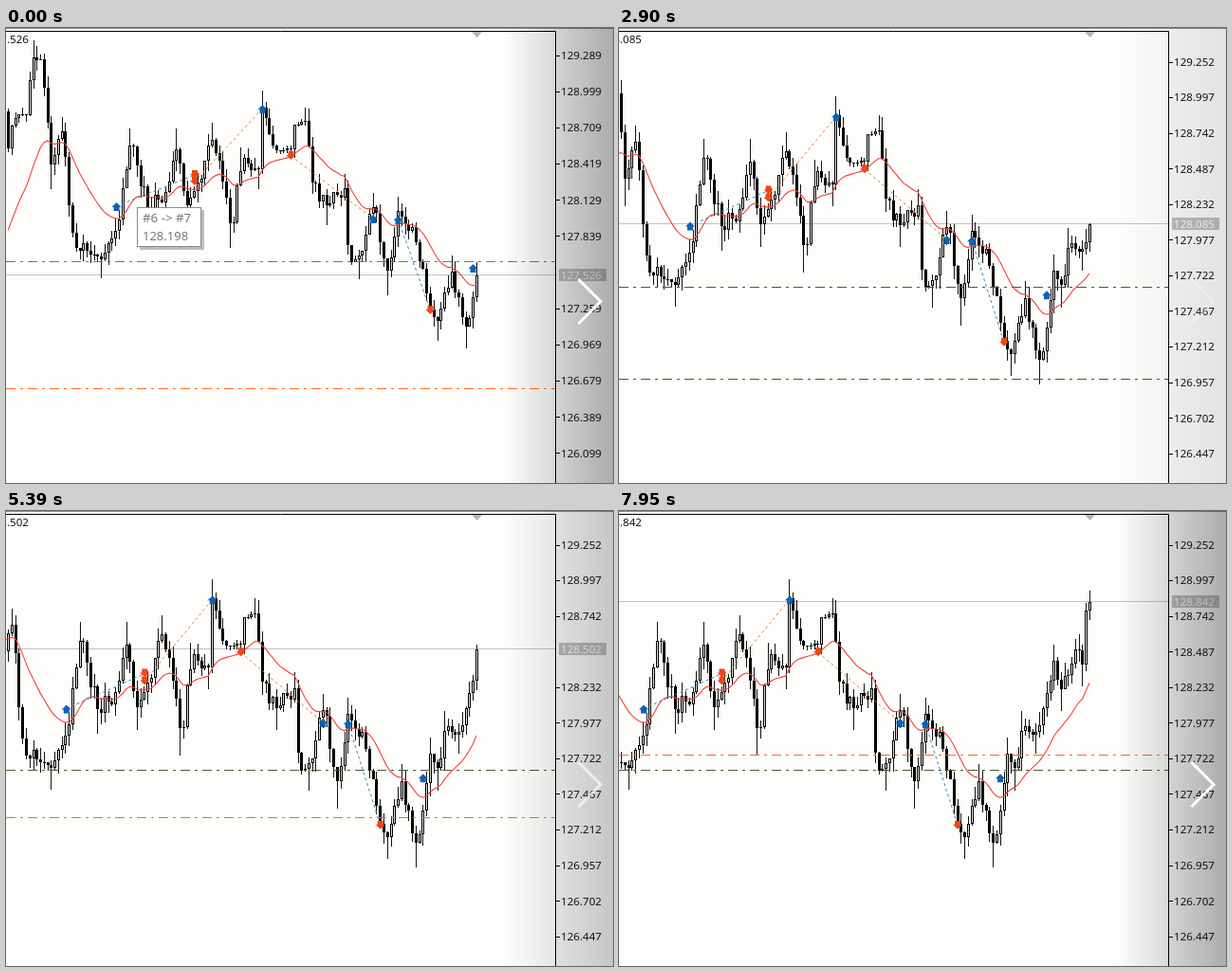
Recreate the animation shown at these times as an HTML page with a canvas. Size 640 by 480 pixels, loop 8 s.

```html
<!DOCTYPE html>
<html lang="en">
<head>
<meta charset="utf-8">
<title>Price chart replay</title>
<style>
html, body { margin: 0; width: 100%; height: 100%; overflow: hidden; background: #fdfdfc; }
canvas { display: block; width: 640px; height: 480px; }
</style>
</head>
<body>
<canvas id="stage" width="640" height="480"></canvas>
<script>
const ctx = document.getElementById('stage').getContext('2d');
const LOOP = 8000, PITCH = 3.77, LAST_X = 496, AXIS = 580;
const FIRST = -131, NEWEST = 24, ENTRY = 127.63, EMA_RATE = 2 / 22;
const BLUE = '#0e63b4', ORANGE = '#ee4716', FLAME = '#ff6a1e', INK = '#141414';

const WIDE = { top: 129.289, y: 28.5, step: 0.29, gap: 38.18, entry: '#3f9a4a' };
const TIGHT = { top: 129.252, y: 35.5, step: 0.255, gap: 37.57, entry: '#4d5a30' };

// last = newest candle shown, stop = price of the stop line
const screens = [
  { at: 0, last: 0, price: 127.526, scale: WIDE, stop: 126.615, tip: true },
  { at: 1590, last: 4, price: 127.721, scale: WIDE, stop: 126.8 },
  { at: 2650, last: 11, price: 128.085, scale: TIGHT, stop: 126.976, ink: TIGHT.entry },
  { at: 3760, last: 13, price: 128.056, scale: TIGHT, stop: 127.132 },
  { at: 4950, last: 14, price: 128.502, scale: TIGHT, stop: 127.295 },
  { at: 6100, last: 15, price: 128.379, scale: TIGHT, stop: 127.499 },
  { at: 7340, last: 24, price: 128.842, scale: TIGHT, stop: 127.74 }
];

// Turning points of the price, in pixels of the wide scale
const turns = [
  [2,128],[7,96],[21,92],[29,27],[36,32],[48,150],[59,108],[71,226],[86,236],[101,244],
  [116,212],[131,120],[150,192],[170,170],[181,120],[190,188],[206,158],[218,114],[237,212],
  [249,140],[266,150],[270,80],[282,128],[300,128],[304,100],[316,98],[321,160],[338,188],
  [357,168],[361,243],[370,245],[387,188],[403,262],[412,192],[430,212],[448,302],[455,310],
  [469,254],[480,303],[486,318],[500,229],[507,245],[516,204],[530,210],[549,142],[556,170],
  [575,132],[579,147],[583,91],[587,88]
];

// dir 1 = buy, -1 = sell; the last position stays open
const trades = [
  { dir: 1, from: [116.5, 188], to: [199, 155] },
  { dir: -1, from: [199, 162], to: [270.5, 85] },
  { dir: -1, from: [300.5, 135], to: [387, 201] },
  { dir: 1, from: [413.5, 202], to: [447.5, 298] },
  { dir: 1, from: [492.5, 253] }
];

const toWide = p => WIDE.y + (WIDE.top - p) / WIDE.step * WIDE.gap;
const toPrice = y => WIDE.top - (y - WIDE.y) / WIDE.gap * WIDE.step;

function noise(n) {
  const s = Math.sin(n * 127.1 + 11.7) * 43758.5453;
  return s - Math.floor(s);
}

// Closes follow the turns; steep stretches are rougher, and turns get long wicks.
function makeCandles() {
  const list = [];
  let open = 88, ema = 222;
  for (let i = FIRST; i <= NEWEST; i++) {
    const x = LAST_X + i * PITCH;
    const k = Math.max(1, turns.findIndex((p, n) => p[0] >= x || n === turns.length - 1));
    const [x0, y0] = turns[k - 1], [x1, y1] = turns[k];
    const slope = (y1 - y0) / (x1 - x0);
    const near = turns.findIndex(p => Math.abs(p[0] - x) <= PITCH / 2);
    const rough = near < 0 ? Math.min(18, 3 + Math.abs(slope) * 14) : 0;
    const close = y0 + slope * (Math.min(x, x1) - x0) + (noise(i) - 0.5) * rough;
    const reach = Math.min(13, 4 + Math.abs(slope) * 12);
    let high = Math.min(open, close) - noise(i + 300) * reach;
    let low = Math.max(open, close) + noise(i + 600) * reach;
    if (near > 0 && near < turns.length - 1) {
      const before = turns[near][1] - turns[near - 1][1];
      const after = turns[near][1] - turns[near + 1][1];
      if (before > 0 && after > 0) low = Math.max(low, turns[near][1] + 20);
      if (before < 0 && after < 0) high = Math.min(high, turns[near][1] - 14);
    }
    list.push({ i, x, open, close, high, low, emaBefore: ema });
    ema += (close - ema) * EMA_RATE;
    open = close;
  }
  return list;
}
const candles = makeCandles();

function line(points, ink, dash = [], width = 1) {
  ctx.strokeStyle = ink;
  ctx.lineWidth = width;
  ctx.setLineDash(dash);
  ctx.beginPath();
  points.forEach(([x, y]) => ctx.lineTo(x, y));
  ctx.stroke();
  ctx.setLineDash([]);
}
function rect(x, y, w, h, fill) {
  ctx.fillStyle = fill;
  ctx.fillRect(x, y, w, h);
}
function shape(points, fill) {
  ctx.fillStyle = fill;
  ctx.beginPath();
  points.forEach(([x, y]) => ctx.lineTo(x, y));
  ctx.fill();
}
function text(str, x, y, ink, size = 11.6, align = 'left') {
  ctx.font = `${size}px "Noto Sans", "Open Sans", sans-serif`;
  ctx.textAlign = align;
  ctx.fillStyle = ink;
  ctx.fillText(str, x, y);
}

function drawBackground() {
  rect(0, 0, 640, 480, '#fdfdfc');
  rect(AXIS, 0, 60, 480, '#f6f6f6');
  rect(0, 0, 640, 1, '#909090');
}

function drawCandle(c, x, close, Y) {
  x = Math.round(x);
  const top = Math.round(Y(Math.min(c.open, close)));
  const height = Math.max(1, Math.round(Y(Math.max(c.open, close))) - top);
  const high = Math.min(Math.round(Y(c.high)), top);
  const low = Math.max(Math.round(Y(c.low)), top + height);
  rect(x, high, 1, low - high, INK);
  rect(x - 1, top, 3, height, '#000');
  if (close < c.open && height > 2) rect(x, top + 1, 1, height - 2, '#e2e2dc');
}

function drawArrow(x, y, dir) {
  const outline = [[-5, 1], [0, -4], [5, 1], [3, 1], [3, 5], [-3, 5], [-3, 1]];
  shape(outline.map(([dx, dy]) => [x + dx, y + dy * dir]), dir > 0 ? BLUE : ORANGE);
}

function drawTrades(place) {
  for (const { dir, from, to } of trades) {
    if (to) {
      line([place(from), place(to)], dir > 0 ? '#3a86b4' : '#e8803a', [3, 3]);
      drawArrow(...place(to), -dir);
    }
    drawArrow(...place(from), dir);
  }
}

function drawPlot(s, priceY) {
  const { scale, last } = s;
  const Y = y => priceY(toPrice(y));
  const X = x => x - last * PITCH;
  const level = (price, ink, dash) => {
    const y = Math.round(priceY(price)) - 0.5;
    line([[0, y], [AXIS, y]], ink, dash);
  };

  ctx.save();
  ctx.beginPath();
  ctx.rect(0, 4, AXIS, 476);
  ctx.clip();
  level(s.price, '#c2c2c6');

  const average = [];
  for (const c of candles.filter(c => c.i <= last)) {
    const close = c.i === last ? toWide(s.price) : c.close;
    drawCandle(c, X(c.x), close, Y);
    average.push([X(c.x), Y(c.emaBefore + (close - c.emaBefore) * EMA_RATE)]);
  }
  line(average, '#f0403a', [], 1.1);

  drawTrades(([x, y]) => [X(x), Y(y)]);
  level(ENTRY, scale.entry, [10, 5, 3, 5]);
  level(s.stop, s.ink || FLAME, [10, 5, 3, 5]);
  shape([[491, 4], [502, 4], [496.5, 10]], '#b4b4b4');
  ctx.restore();
}

function drawAxis(s, priceY) {
  const { scale } = s, y = priceY(s.price), label = s.price.toFixed(3);
  line([[0, 3.5], [AXIS - 0.5, 3.5], [AXIS - 0.5, 480]], '#000');
  for (let n = 0; n < 12; n++) {
    const tick = scale.y + n * scale.gap;
    if (Math.abs(tick - y) < 9) continue;
    rect(AXIS, Math.round(tick), 4, 1, '#000');
    text((scale.top - n * scale.step).toFixed(3), 585, tick + 4.3, INK);
  }
  rect(583, Math.round(y) - 7, 50, 13, '#bababa');
  text(label, 585, y + 4, '#f8f8f8');
  text(label, 24, 16, INK, 11.6, 'right');
}

function drawTip() {
  rect(141, 192, 68, 42, 'rgba(90,90,100,.4)');
  rect(138, 189, 68, 42, '#fff');
  ctx.strokeStyle = '#8a8a8a';
  ctx.lineWidth = 1;
  ctx.strokeRect(138.5, 189.5, 67, 41);
  text('#6 -> #7', 144, 205, '#77777c', 13.3);
  text('128.198', 144, 224, '#77777c', 13);
}

function drawNext(alpha) {
  const shade = ctx.createLinearGradient(525, 0, 640, 0);
  shade.addColorStop(0, 'rgba(0,0,0,0)');
  shade.addColorStop(1, 'rgba(0,0,0,.3)');
  ctx.save();
  ctx.globalAlpha = alpha;
  rect(525, 0, 115, 480, shade);
  line([[603.5, 265], [627, 288.5], [603.5, 312]], '#fff', [], 3);
  ctx.restore();
}

// The button dips once on the first screen, then fades in after every change.
function nextAlpha(t, s) {
  if (s.at > 0) return Math.min(1, (t - s.at) / 580) ** 1.6;
  return 1 - 0.6 * Math.max(0, 1 - Math.abs(t - 1040) / 160);
}

const start = performance.now();
function frame() {
  const t = Math.max(0, performance.now() - start) % LOOP;
  const s = screens.filter(v => v.at <= t).pop();
  const priceY = p => s.scale.y + (s.scale.top - p) / s.scale.step * s.scale.gap;
  drawBackground();
  drawPlot(s, priceY);
  drawAxis(s, priceY);
  if (s.tip) drawTip();
  drawNext(nextAlpha(t, s));
  requestAnimationFrame(frame);
}
frame();
</script>
</body>
</html>
```
